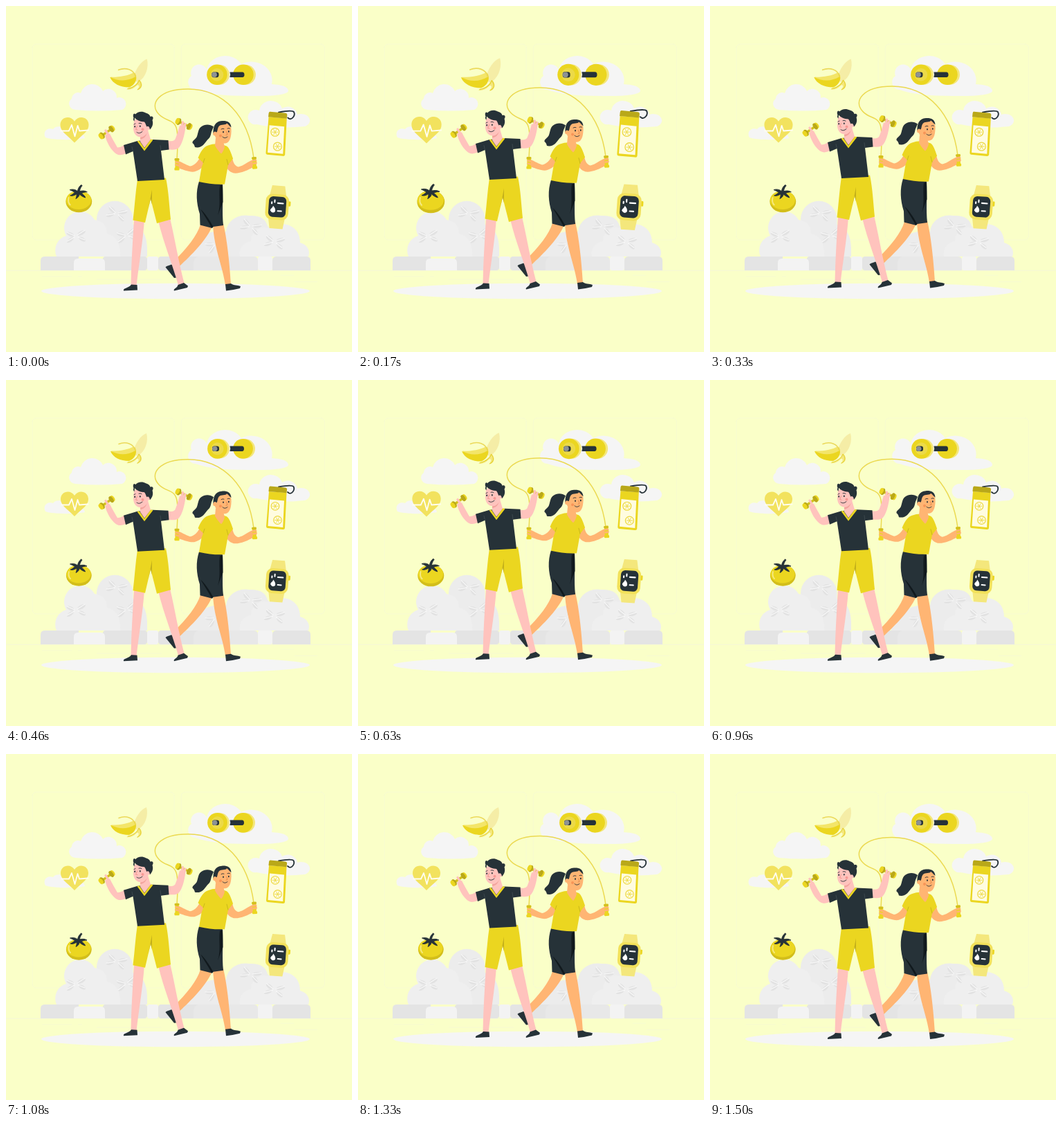
An HTML page for the animation above (1.54 s loop, 500x500 px).

```html
<!DOCTYPE html>
<html lang="en">
<head>
<meta charset="utf-8">
<title>Workout</title>
<style>
  html, body { margin: 0; width: 100%; height: 100%; overflow: hidden; background: #faffc8; }
  svg { display: block; width: 100vw; height: 100vh; }
  .icon { transform-box: fill-box; transform-origin: center; }
  .line { fill: none; stroke-linecap: round; stroke-linejoin: round; }
  .y { fill: #ebd620; }
  .pale { fill: #f4e77c; }
  .olive { fill: #b9a819; }
  .dark { fill: #263238; }
  .pink { fill: #ffc3bd; }
  .tan { fill: #ffb573; }
  .cloud { fill: #f5f5f5; }
</style>
</head>
<body>
<svg viewBox="0 0 500 500">
  <defs>
    <g id="sprig">
      <g fill="#e2e2e2">
        <ellipse cx="-8" cy="-2" rx="6" ry="2.8" transform="rotate(24 -8 -2)"/>
        <ellipse cx="8" cy="-4" rx="6.5" ry="2.8" transform="rotate(-28 8 -4)"/>
        <ellipse cx="9" cy="5" rx="5.5" ry="2.6" transform="rotate(28 9 5)"/>
        <ellipse cx="-8" cy="6" rx="6" ry="2.6" transform="rotate(-36 -8 6)"/>
      </g>
      <path class="line" stroke="#f8f8f8" stroke-width="1.2" d="M-13 -5L-2 0M2 -1L13 -8M3 2L13 6M-2 2L-13 8"/>
    </g>
    <g id="weight">
      <path class="line" stroke="#d3c01c" stroke-width="3" d="M-9 0H9"/>
      <ellipse class="olive" cx="-7" rx="2.8" ry="4.4"/>
      <ellipse class="y" cx="-8.8" rx="2.5" ry="4"/>
      <ellipse class="y" cx="8.8" rx="2.6" ry="4"/>
      <ellipse class="olive" cx="7" rx="2.4" ry="4.4"/>
    </g>
    <g id="grip">
      <rect class="y" x="-2.6" y="-7" width="5.2" height="14" rx="1"/>
      <rect fill="#d3c01c" x="-3.4" y="-8.5" width="6.8" height="3.6" rx="1.2"/>
      <rect class="y" x="-3.6" y="5" width="7.2" height="4" rx="1.2"/>
    </g>
    <g id="slice">
      <circle r="5.8" fill="#fffce0" stroke="#ecd940" stroke-width="1.2"/>
      <path class="line" stroke="#ecd940" stroke-width=".9" d="M-4 0H4M-2 -3.5L2 3.5M2 -3.5L-2 3.5"/>
    </g>
  </defs>

  <rect width="500" height="500" fill="#faffc8"/>
  <g fill="none" stroke="#ebebeb" stroke-width=".25">
    <rect x="38.2" y="55" width="205" height="283" rx="5.7"/>
    <rect x="253.3" y="55" width="207" height="283" rx="5.7"/>
    <path stroke-width=".4" d="M0 382.3H500"/>
    <path d="M417 398.5h33M322 401.2h9M397 389.2h19M52 390.9h43M104 390.9h6M131 395.1h94"/>
  </g>

  <g class="cloud">
    <path d="M100 150A10 9 0 0 1 95 134A9 9 0 0 1 108 126A17 17 0 0 1 140 123A12 12 0 0 1 160 133A9 9 0 0 1 168 150Q134 153 100 150Z"/>
    <path d="M57 190C53 183 58 175 68 178C73 172 82 174 86 179C98 176 112 182 114 191C100 194 68 194 57 190Z"/>
    <path d="M274 121A11 11 0 0 1 268 101A11.500 11.500 0 0 1 290 92A27 24 0 0 1 340 84A30 27 0 0 1 384 113Q408 114 408 123Q405 131 350 130Q298 130 274 121Z"/>
    <path d="M362 171A10.500 10.500 0 0 1 356 151Q360 149 366 151A17 16 0 0 1 399 148A14 13 0 0 1 421 157A12 9 0 0 1 432 174Q395 178 362 171Z"/>
  </g>

  <g fill="#ececec">
    <path d="M131 362V308A26 26 0 0 1 183.500 308V316Q203 321 204 350V362Z"/>
    <path d="M262 362C260 349 266 339 279 338C284 328 303 323 318 326A28 25 0 0 1 352 303Q374 302 378 318C390 328 392 346 390 362Z"/>
  </g>
  <g fill="#efefef">
    <path d="M73 362A22 22 0 0 1 87 332A22 22 0 0 1 128 309Q146 312 146 329Q166 333 165 362Z"/>
    <path d="M338 362C336 349 344 342 354 340C354 326 367 317 380 321C395 309 425 314 425 342C436 345 440 354 437 362Z"/>
  </g>
  <use href="#sprig" x="101" y="332"/>
  <use href="#sprig" transform="translate(160 299) rotate(20)"/>
  <use href="#sprig" transform="translate(174 331) rotate(-8)"/>
  <use href="#sprig" transform="translate(354 318) rotate(25)"/>
  <use href="#sprig" transform="translate(388 340) rotate(15)"/>
  <use href="#sprig" transform="translate(302 343) rotate(-25)"/>
  <g fill="#e4e4e4">
    <path d="M50 382V368Q50 362 56 362H105V382Z"/>
    <rect x="140" y="362" width="64" height="20" rx="4"/>
    <rect x="220" y="362" width="60" height="20" rx="4"/>
    <path d="M385 382V368Q385 362 391 362H434Q440 362 440 368V382Z"/>
  </g>
  <path fill="#e8e8e8" d="M271 382V371Q271 365 277 362H358Q364 362 364 368V382Z"/>
  <g fill="#f3f3f3">
    <path d="M98 382V371Q98 365 104 365H137Q143 365 143 371V382Z"/>
    <rect x="204" y="362" width="16" height="20" rx="3"/>
    <rect x="364" y="362" width="21" height="20" rx="3"/>
  </g>
  <ellipse class="cloud" cx="245" cy="412" rx="194" ry="11.300"/>

  <!-- banana -->
  <g class="icon">
    <path fill="#f5eda6" d="M183 106C187 90 195 80 203 77C206 88 202 103 190 110Z"/>
    <path class="y" d="M151 103C161 104 176 103 186 97C191 105 186 114 178 117C165 117 155 112 151 103Z"/>
    <path fill="#f3e569" d="M151.500 102.500C162 103 176 101 185 96L187 102C176 109 162 109 151.500 102.500Z"/>
    <path class="line" stroke="#ebd95a" stroke-width="1.600" d="M163 92.500C173 88.500 185 92 186.500 102"/>
    <path class="pale" d="M174 120C184 117 190 112 192 106C199 112 196 120 189 121C194 115 191 112 188 115C184 119 179 121 174 120Z"/>
    <path class="line" stroke="#e3cf2a" stroke-width="1" d="M176 119C186 117 191 111 192 107C197 113 195 118 190 120"/>
  </g>

  <!-- dumbbell -->
  <g class="icon">
    <circle class="pale" cx="309" cy="99.300" r="14"/>
    <circle class="y" cx="305.500" cy="99.300" r="14.400"/>
    <circle fill="#ecda48" cx="305.500" cy="99.300" r="9"/>
    <rect class="dark" x="298" y="95.500" width="10" height="7.600" rx="3"/>
    <ellipse fill="#8d9294" cx="301.700" cy="99.300" rx="3.700" ry="3.600"/>
    <circle class="pale" cx="346" cy="99.300" r="14"/>
    <circle class="y" cx="342.500" cy="99.300" r="14.400"/>
    <path class="dark" d="M323.500 95.500H341Q344 95.500 344 99.300T341 103H323.500Q325 99 323.500 95.500Z"/>
  </g>

  <!-- heart -->
  <g class="icon">
    <path fill="#f2e25e" d="M99 197C87 185 79 181 79 172C79 160 94 158 99 167C104 158 119 160 119 172C119 181 111 185 99 197Z"/>
    <path class="line" stroke="#fffef0" stroke-width="1.800" d="M80 180.500H91L95 172L99.500 188L103.500 173L106 180.500L118.500 179.500"/>
  </g>

  <!-- bottle -->
  <g class="icon">
    <path class="line" stroke="#263238" stroke-width="1.800" d="M394 154.500C402 153 413 151 415.500 154C418 159 413 165 409 163.500L407 162"/>
    <path class="y" d="M380 161L405.500 163L403 214Q402.800 216.300 400 216L378 214Q375.800 213.800 376 211.500Z"/>
    <path fill="#fffce0" d="M381 172.500L402 174.500L400.200 213L378.500 211Z"/>
    <path class="olive" d="M382 153.500L404 155.500Q406.500 156 406 159L405.500 163.300L379.500 161L380 156Q380.200 153.300 382 153.500Z"/>
    <use href="#slice" x="389" y="182.300"/>
    <use href="#slice" x="392.500" y="202.500"/>
  </g>

  <!-- tomato -->
  <g class="icon">
    <ellipse fill="#d3be1a" cx="105.300" cy="282.500" rx="18.400" ry="15.200"/>
    <ellipse class="y" cx="105" cy="280.500" rx="17.600" ry="13"/>
    <path class="line" stroke="#f5ea84" stroke-width="1.800" d="M91 277C90 281 91 285 93 287"/>
    <path class="dark" stroke="#263238" stroke-width=".9" stroke-linejoin="round" d="M103.500 268C104 264 106 261 108.500 259L110 260C107.500 263 106.500 266 106.500 268C110 267 114 267 117 269C113 269 111 270 109 271C112 273 114 275 114.500 277C111 276 108 274 106 272C106 275 104 277 101 278.500C102 276 102.500 274 102 272C99 274 96 275 93 274C96 273 98 271 99.500 269.500C97 268 95 267 92.500 266C97 264.500 101 266 103.500 268Z"/>
  </g>

  <!-- watch -->
  <g class="icon">
    <g transform="rotate(4 392 290.500)">
      <path class="pale" d="M383 260.500H401L404 276H380Z M380 304H404L401.500 321H383Z"/>
      <rect class="y" x="407" y="281.500" width="3.500" height="7" rx="1.200"/>
      <rect fill="#f2e15a" x="375.500" y="272.500" width="32.500" height="36" rx="9"/>
      <rect class="dark" x="379.800" y="275.800" width="24.500" height="29" rx="6"/>
      <g class="line" stroke="#fff" stroke-width="2">
        <path d="M384 284V286M388 281V284M392.500 285H400M393 296H398"/>
      </g>
      <path fill="#fff" d="M382.500 296C382.500 293 386 292 386 289C389 292 390 294 389.500 297Q386 301 382.500 296Z"/>
    </g>
  </g>

  <g id="people">
    <!-- woman -->
    <g>
      <path class="line" stroke="#ebd950" stroke-width="1.500" d="M247 222C248 205 249 192 247 180C244 163 231 168 221 157C206 142 221 120.500 263 120.500C316 121 350 160 358 220"/>
      <path class="tan" d="M281 316C276 333 262 350 241 371L248 379C262 366 288 342 298 319Z"/>
      <path class="dark" d="M239 374L246 379C243 384 247 389 246.500 393L243 393.500L230.500 378C233 375 236 376 239 374Z"/>
      <path class="tan" d="M299 317L314 315C319 335 323 370 325 403L317 404C313 376 301 352 299 317Z"/>
      <path class="dark" d="M317 402.500L325 401.500C329 405 335 403.500 339 405.500L338 408.500Q328 411 318 412Z"/>
      <path class="dark" d="M279 254C274 269 275 285 280 301L280.500 317L298 321.500L299.500 319.500L314 317.500C312 299 314 279 313 258Z"/>
      <path fill="#11191d" d="M309 260C307 275 311 288 306 303L313.500 284L313 259ZM281 294C287 304 293 313 297 321L299.500 319.500C294 310 288 300 281 294Z"/>
      <path class="tan" d="M281 218C277 226 272 231 266 232C259 230 253 225 248 224Q243 228 245.500 233C255 237 266 241 272 240C280 238 287 232 290 224Z"/>
      <path class="tan" d="M327 219C328 227 331 232 336 233C344 231 350 225 356 223L362 223Q364 229 358 233C349 238 338 243 329 242C322 240 318 235 318 228Z"/>
      <path class="y" d="M292 202C285 204 281 212 277.500 220L285 227L282.500 234L279 254.500Q298 259 316 258L321 230L328 221C325 212 323 206 319 203Q305 197 292 202Z"/>
      <path class="line" stroke="#bba919" stroke-width=".7" d="M285 227L287 221M321 230L319 222"/>
      <path class="tan" d="M303 191L302 202C305 208 309 212 311 214C313 212 315 208 316 204L314 196Z"/>
      <path class="dark" d="M300 175C295 171 287 171 282 175C277 179 278 185 275.500 190C273 194 269 195 269.500 198.500Q272 200 273 204.500Q277 205.500 281 204C286 202 288 197 292 193C296 190 296 185 297 182Z"/>
      <path class="tan" d="M302 172C309 166 324 168 325.500 178C326 188 324 198 317 199C309 200 302 193 301 184Z"/>
      <circle class="tan" cx="302" cy="185" r="3"/>
      <path class="dark" d="M299.500 185C299 175 302 167 312 166.500C319 166 325 168 325.500 176C322 173 321 171 319 170C318 173 311 171 308 174C305 177 306 183 304 183C302 181 300 182 299.500 185Z"/>
      <g class="line" stroke="#263238" stroke-width=".9">
        <path d="M311 178.500Q313 177 315 178M320 177.500Q322 176.500 323.500 177.500M313 189.500Q316 193 320 189.500"/>
        <path stroke-width="1.800" d="M314 182.200V182.900M321.800 181.500V182.200"/>
        <path stroke="#e08a4c" d="M318.500 182L320 186.500L318 187"/>
      </g>
      <circle fill="#f79558" cx="310" cy="188" r="2"/>
      <use href="#grip" x="247" y="229"/>
      <use href="#grip" transform="translate(359 227) rotate(-4)"/>
      <path class="line" stroke="#ffb573" stroke-width="2.600" d="M245.500 226L249.500 227M245.500 230L249.500 231M357 224L361 223.500M357.500 228L361.500 227.500"/>
    </g>

    <!-- man -->
    <g>
      <path class="pink" d="M185 309H200C198 340 192 374 188.500 405L180.500 404C181 373 183 341 185 309Z"/>
      <path class="pink" d="M220 311L237 307C244 337 249 368 257.500 401L249 404C241 375 228 344 220 311Z"/>
      <path class="dark" d="M181 403L189.500 403.500L190 411L170 412C168.500 408 178 408 181 403Z"/>
      <path class="dark" d="M248.500 403.500L257 400.500L263 405L262 407.500L243 412C241 409 248 408 248.500 403.500Z"/>
      <path class="y" d="M190 251L231 249C235 268 236 290 238 309L218 314.500L209 279L201 313.500L183.500 310C186 290 187 270 190 251Z"/>
      <path fill="#c3b01b" d="M211 266L205.500 294L209 279L211 287Z"/>
      <path class="pink" d="M143 187C145 197 152 209 159 214C164 217 169 216 174 213L171 201C167 204 163 205 161 205C157 198 153 191 150 185Z"/>
      <path class="pink" d="M233 195C240 197 243 195 244.500 193C247 187 249 180 251 173L259.500 175C258 188 254 202 249 206C245 209 240 208 233 208Z"/>
      <path class="dark" d="M190 195.500L170 201.500L173 215L183.500 210.500L190 253.500L229 251.500L224 209.500L235.500 208L234.500 194.500L212 193.500Z"/>
      <path class="line" stroke="#4a565c" stroke-width=".6" d="M183.500 210.500L182 204M224 209.500L223 202"/>
      <path class="y" d="M189.500 196L200 210L212.500 194L209 193L200 206L192.500 195Z"/>
      <path class="pink" d="M194 186V196.500L200 205.500L209 193.500L205 180Z"/>
      <path fill="#f3a49e" d="M194 190Q200 190 204 183Q202 192 194 193Z"/>
      <path class="pink" d="M185 166C192 160 206 162 206.500 174C206 183 202 189 195 190C188 190 184 184 184 177Z"/>
      <circle class="pink" cx="206" cy="175.500" r="3.600"/>
      <path class="dark" d="M184.500 162C182.500 158 185 154 187 157C190 153 197 152 202 155C206 156 208 158 208.500 160.500C212 159 214 162 211.500 165.500C213 170 212 175 208 179C207.500 175 205 173 203.500 175C202 173 202 170 200 168C195 168 188 165 186 162L185.500 167Q183 165 184.500 162Z"/>
      <g class="line" stroke="#263238" stroke-width=".9">
        <path d="M185 171.500L187 170.500M192 170Q194 169 196 170.500M189 183Q192.500 186 197 182"/>
        <path stroke-width="1.800" d="M186.200 174.300V175M193.800 173.800V174.500"/>
        <path stroke="#ef8f88" d="M189.500 174L187.500 179L190 179.500"/>
      </g>
      <circle fill="#f79a95" cx="197.500" cy="178.800" r="2"/>
      <use href="#weight" transform="translate(145.500 183) rotate(-35) scale(1.15)"/>
      <use href="#weight" transform="translate(257 171) rotate(25) scale(1.15)"/>
      <path class="line" stroke="#ffc3bd" stroke-width="3.400" d="M144 180.500L147.500 186M255.500 168.500L254.500 174M259 171L257.500 176"/>
    </g>
  </g>
</svg>
<script>
  const LOOP = 1540, STEPS = 37, RISE = 9;
  // [progress, scale]
  const BEAT = [[0, 1], [.1, 1.1], [.3, 1], [.4, 1], [.5, 1.1], [.6, 1], [1, 1]];
  const people = document.getElementById('people');
  const icons = document.querySelectorAll('.icon');

  function sample(keys, p) {
    const k = Math.max(1, keys.findIndex(([at]) => at >= p));
    const [p0, v0] = keys[k - 1], [p1, v1] = keys[k];
    return v0 + (v1 - v0) * (p - p0) / (p1 - p0);
  }

  function draw(now) {
    const step = Math.floor((now % LOOP + 5) * STEPS / LOOP) % STEPS;
    const p = (step + 1) / STEPS;
    const lift = RISE * (1 - Math.abs(2 * p - 1));
    people.setAttribute('transform', `translate(0 ${-lift})`);
    const scale = `scale(${sample(BEAT, p)})`;
    icons.forEach(icon => { icon.style.transform = scale; });
  }

  const start = performance.now();
  function tick() {
    draw(performance.now() - start);
    requestAnimationFrame(tick);
  }
  tick();
</script>
</body>
</html>
```
